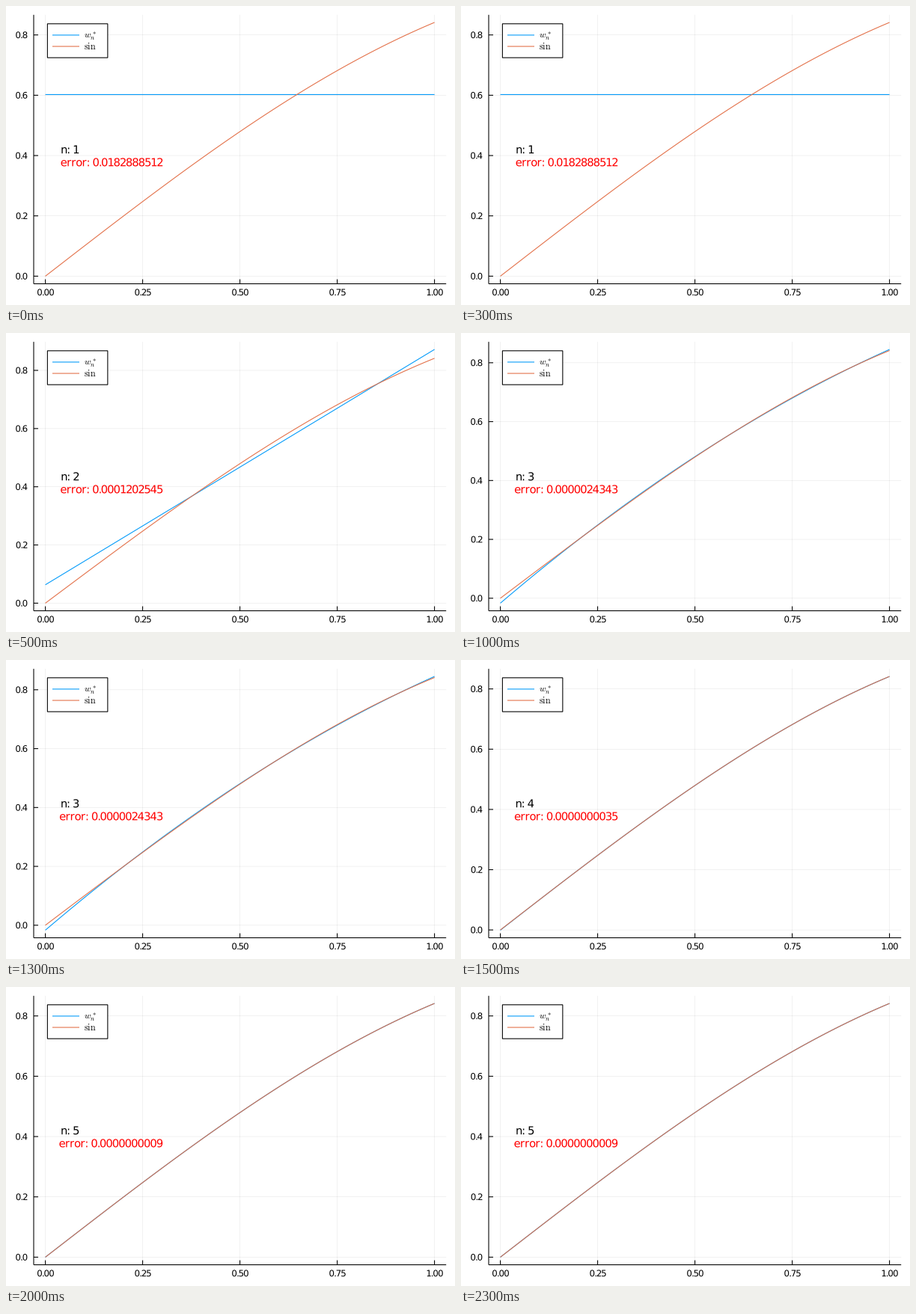
A matplotlib script that plays this animation: 600 px wide and 400 px high, repeating every 2.5 s.

```python
import numpy as np
import matplotlib.pyplot as plt
from matplotlib.animation import FuncAnimation
from matplotlib.patches import PathPatch, Rectangle
from matplotlib.path import Path
from matplotlib.textpath import TextPath

W, H, DPI = 600, 400, 100
BLUE, ORANGE = "#009afa", "#e36f47"
LEFT, RIGHT, TOP, BOTTOM = 37.0, 588.2, 11.8, 371.6
LINE, GRID, TICK = 1.08, 0.54, 6
SMALL, LARGE = 11.85, 14.8
ERRORS = (0.0182888512, 0.0001202545, 0.0000024343, 0.0000000035, 0.0000000009)

plt.rcParams.update({
    "font.family": "DejaVu Sans",
    "mathtext.fontset": "cm",
    "path.snap": False,
    "lines.solid_capstyle": "butt",
})


def pt(px):
    """Pixels to points."""
    return px * 72 / DPI


# Least squares fit of sin on [0, 1] with weight x, by Gauss quadrature
nodes, weights = np.polynomial.legendre.leggauss(40)
nodes, weights = (nodes + 1) / 2, weights / 2


def best_fit(n, x):
    coef = np.polyfit(nodes, np.sin(nodes), n - 1, w=np.sqrt(weights * nodes))
    return np.polyval(coef, x)


x = np.linspace(0, 1, 101)
sine = np.sin(x)

# The whole stage in pixel coordinates, y downwards
fig = plt.figure(figsize=(W / DPI, H / DPI), dpi=DPI, facecolor="white")
ax = fig.add_axes([0, 0, 1, 1])
ax.set_xlim(0, W)
ax.set_ylim(H, 0)
ax.axis("off")


def to_px(v):
    return LEFT + (v + 0.03) / 1.06 * (RIGHT - LEFT)


def line(xs, ys, color="black", width=LINE, **kw):
    return ax.plot(xs, ys, color=color, linewidth=pt(width), **kw)[0]


def tight_text(string, em):
    """Outline where each glyph starts at the ink edge of the one before."""
    paths, pen = [], 0
    for ch in string:
        if ch == " ":
            pen += 0.318 * em
            continue
        glyph = TextPath((0, 0), ch, size=em)
        paths.append(Path(glyph.vertices * [1, -1] + [pen, 0], glyph.codes))
        pen += glyph.get_extents().x1
    return Path.make_compound_path(*paths), pen


def write(patch, string, em, x, base, align=1.0):
    """Set a text; align 1 puts its right end at x, 0.5 its middle."""
    path, width = tight_text(string, em)
    patch.set_path(Path(path.vertices + [x - align * width, base], path.codes))


def text_patch(color="black"):
    return ax.add_patch(PathPatch(Path([(0, 0)]), facecolor=color, linewidth=0))


# Grid, ticks and axes
xticks, yticks = np.linspace(0, 1, 5), np.linspace(0, 0.8, 5)
for v in xticks:
    px = to_px(v)
    line([px, px], [TOP, BOTTOM], width=GRID, alpha=0.1)
    line([px, px], [BOTTOM - TICK, BOTTOM])
    write(text_patch(), f"{v:.2f}", SMALL, px, 387.2, align=0.5)
rows = [(v,
         line([LEFT, RIGHT], [0, 0], width=GRID, alpha=0.1),
         line([LEFT, LEFT + TICK], [0, 0]),
         text_patch()) for v in yticks]
line([LEFT, LEFT], [TOP, BOTTOM])
line([LEFT, RIGHT], [BOTTOM, BOTTOM])

# Curves
fit_line = line(to_px(x), x, BLUE)
sine_line = line(to_px(x), x, ORANGE)

# Legend
box_x, box_y = LEFT + (RIGHT - LEFT) / 30, TOP + (BOTTOM - TOP) / 30
step = 15.12
ax.add_patch(Rectangle((box_x, box_y), 80.5, 3 * step, facecolor="white",
                       edgecolor="black", linewidth=pt(LINE), zorder=3))
for k, (color, label) in enumerate(((BLUE, r"$w_n^{\,*}$"), (ORANGE, r"$\sin$")), 1):
    y = box_y + k * step
    line([62, 98], [y, y], color, zorder=4)
    ax.text(103.5, y + 4, label, fontsize=pt(12), va="baseline", zorder=4)

count, error = text_patch(), text_patch("red")


def update(i):
    n = i + 1
    fit = best_fit(n, x)
    low, high = min(fit.min(), 0), max(fit.max(), sine[-1])
    pad = 0.03 * (high - low)

    def to_py(v):
        return BOTTOM - (v - low + pad) / (high - low + 2 * pad) * (BOTTOM - TOP)

    for v, grid, tick, label in rows:
        y = to_py(v)
        grid.set_ydata([y, y])
        tick.set_ydata([y, y])
        write(label, f"{v:.1f}", SMALL, 28.4, y + 4.3)
    fit_line.set_ydata(to_py(fit))
    sine_line.set_ydata(to_py(sine))
    write(count, f"n: {n}", LARGE, 97.2, 197.2)
    write(error, f"error: {ERRORS[i]:.10f}", LARGE, 209.2, 214.3)
    return fit_line, sine_line, count, error


anim = FuncAnimation(fig, update, frames=5, interval=500, repeat=True, repeat_delay=0)
plt.show()
```
